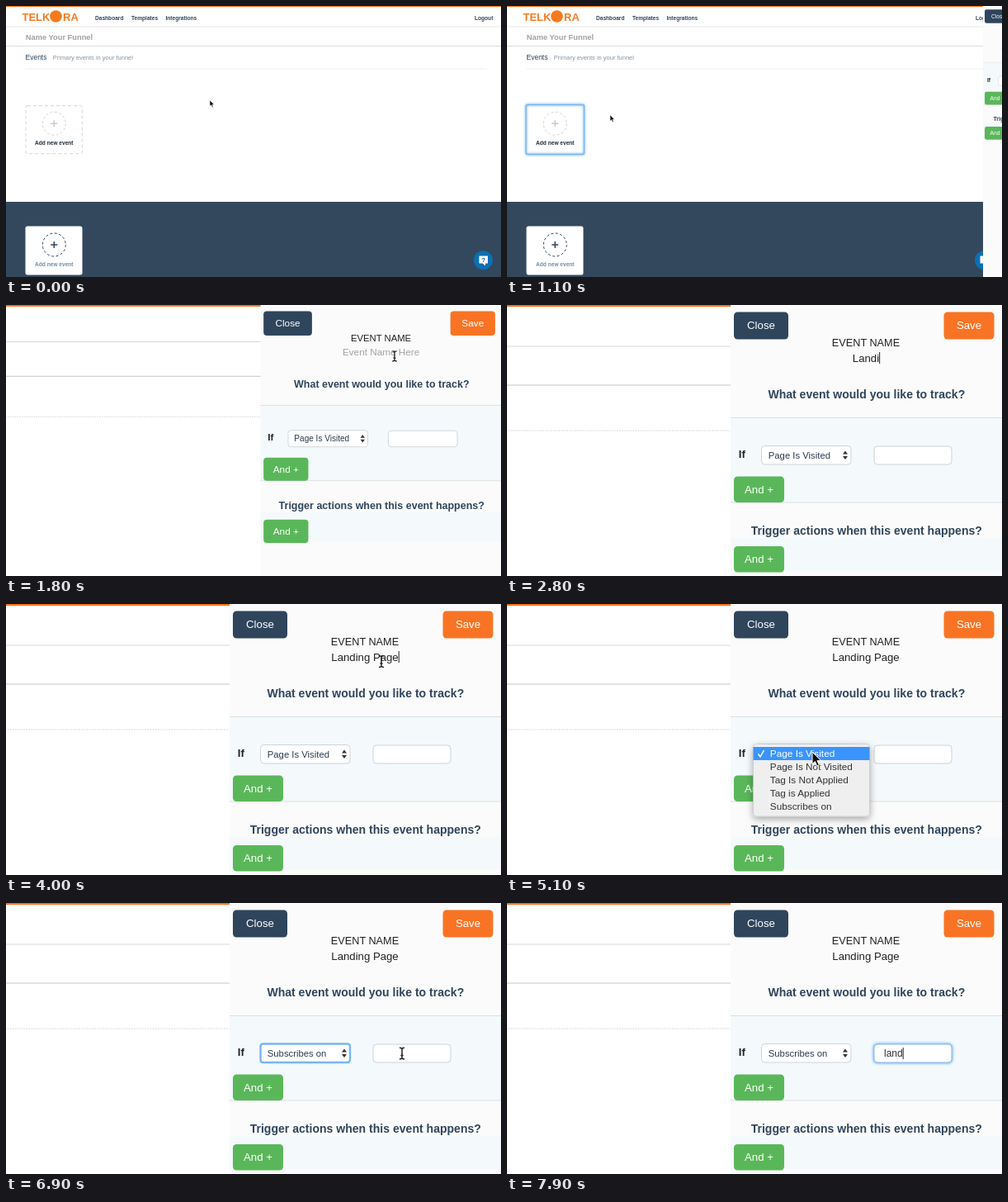
An HTML page that plays this animation: 600 px wide and 328 px high, repeating every 8 s.

```html
<!DOCTYPE html>
<html lang="en">
<head>
<meta charset="utf-8">
<title>Funnel event setup</title>
<style>
  html, body { margin: 0; width: 100%; height: 100%; overflow: hidden; background: #fff; }
  svg { display: block; width: 600px; height: 328px; font-family: "Liberation Sans", Arial, sans-serif; }
  text { white-space: pre; }
  .bold { font-weight: bold; }
  .mid { text-anchor: middle; }
  .navy { fill: #2f455c; }
  .nav { font-size: 6.6px; }
  .rule { stroke: #d9d9d9; stroke-width: .6; }
  .btn { font-size: 13.25px; fill: #fff; }
  .head { font-size: 14.05px; }
  .small { font-size: 11.3px; fill: #2b3b4d; }
  .box { fill: #fff; stroke: #ccd3da; }
  .glow { fill: none; stroke: #78b5f2; }
</style>
</head>
<body>
<svg viewBox="0 0 600 328">
  <defs>
    <filter id="shadow" x="-20%" y="-20%" width="140%" height="150%">
      <feDropShadow dx="0" dy="3" stdDeviation="4" flood-opacity=".35"/>
    </filter>
    <filter id="blur" x="-20%" y="-50%" width="140%" height="200%"><feGaussianBlur stdDeviation="1.5"/></filter>
  </defs>
  <g id="world">
    <!-- funnel page -->
    <rect width="600" height="1.1" fill="#f8701f"/>
    <g class="bold" font-size="13" fill="#f47a20">
      <text x="19.5" y="17.5">TELK</text>
      <circle cx="60.5" cy="12.5" r="7.3"/>
      <text x="69" y="17.5">RA</text>
    </g>
    <g class="nav bold navy">
      <text x="108" y="17">Dashboard</text>
      <text x="152" y="17">Templates</text>
      <text x="193.5" y="17">Integrations</text>
      <text x="568" y="17">Logout</text>
    </g>
    <path class="rule" d="M0 25H600"/>
    <text class="bold" x="23.8" y="41.3" font-size="9.3" fill="#a2a2a2">Name Your Funnel</text>
    <path class="rule" d="M0 48.5H600" style="stroke:#c6c6c6"/>
    <text class="navy" x="23.5" y="65.4" font-size="8.5">Events</text>
    <text x="56.8" y="64.5" font-size="7.5" fill="#8495a3">Primary events in your funnel</text>
    <path class="rule" d="M24 76H582" stroke-dasharray="1 .6"/>

    <rect id="card" x="24" y="120.7" width="68.3" height="58" rx="2" fill="none" stroke="#d6d6d6" stroke-dasharray="4 3"/>
    <g id="cardFocus">
      <rect class="glow" x="23" y="119.5" width="70.5" height="60" rx="2" stroke-width="2" filter="url(#blur)"/>
      <rect class="glow" x="23" y="119.5" width="70.5" height="60" rx="2" stroke-width="1.4"/>
    </g>
    <g fill="none" stroke="#c9c9c9">
      <circle cx="58.3" cy="142.3" r="14" stroke-dasharray="3 2.5" stroke-width=".8"/>
      <path d="M54.3 142.3h8m-4-4v8" stroke-width="1.5"/>
    </g>
    <text class="nav bold mid" x="58.3" y="168" fill="#1f2d3a">Add new event</text>

    <rect y="237" width="600" height="91" fill="#33485c"/>
    <rect x="23.5" y="266.5" width="69" height="59" rx="2.5" fill="#fff"/>
    <g fill="none" stroke="#2f455c">
      <circle cx="58.3" cy="289" r="14" stroke-dasharray="3 2.5"/>
      <path d="M54.3 289h8m-4-4v8" stroke-width="1.5"/>
    </g>
    <text class="nav bold mid" x="58.3" y="314.7" fill="#6f8fa9">Add new event</text>

    <circle cx="578.5" cy="307.7" r="11.5" fill="#0b6fb3"/>
    <path d="M573.5 302.5h10.5v9h-3v3l-3.2-3h-4.3z" fill="#fff"/>
    <text class="bold mid" x="578.8" y="310" font-size="8" fill="#0b6fb3">?</text>

    <!-- event panel, laid out at double size -->
    <g id="panel">
      <rect x="271" width="330" height="660" fill="#fbfbfb"/>
      <path d="M271 136.5H600V239H271zM271 282H600V322H271z" fill="#f4f9fc"/>
      <path d="M271 136.5H600M271 239H600" stroke="#d9dfe3"/>
      <rect x="275" y="8.5" width="66" height="33" rx="4.5" fill="#2f455c"/>
      <text class="btn mid" x="308" y="29.4">Close</text>
      <rect x="529.5" y="8.5" width="61" height="33" rx="4.5" fill="#f87424"/>
      <text class="btn mid" x="560" y="29.4">Save</text>
      <text class="mid" x="435" y="49.8" font-size="12.7" fill="#222">EVENT NAME</text>
      <text class="mid" id="name" x="435" y="68.7" font-size="13.2"></text>
      <path id="nameCaret" d="M0 57v14" stroke="#222"/>
      <text class="head bold navy mid" x="435.8" y="112.7">What event would you like to track?</text>
      <text class="bold" x="280.8" y="184.5" font-size="13.1" fill="#222">If</text>
      <rect class="box" x="308.5" y="170.5" width="108.5" height="22.5" rx="4"/>
      <rect class="glow" id="selectFocus" x="308.5" y="170.5" width="108.5" height="22.5" rx="3" stroke-width="2.4"/>
      <text class="small" id="choice" x="316.8" y="185.6"></text>
      <path d="M407 180.5l3-4 3 4zM407 183l3 4 3-4z" fill="#333"/>
      <rect class="glow" id="fieldGlow" x="445" y="171" width="94" height="22" rx="4" stroke-width="3" filter="url(#blur)"/>
      <rect class="box" id="field" x="445" y="171" width="94" height="22" rx="4"/>
      <text id="value" x="457" y="186" font-size="12" fill="#333"></text>
      <path id="valueCaret" d="M0 175v14" stroke="#222"/>
      <rect x="275" y="207.5" width="61" height="31.5" rx="4.5" fill="#5ab759"/>
      <text class="btn mid" x="305.5" y="227.9">And +</text>
      <text class="head bold navy mid" x="435.8" y="278">Trigger actions when this event happens?</text>
      <rect x="275" y="292" width="61" height="31.5" rx="4.5" fill="#5ab759"/>
      <text class="btn mid" x="305.5" y="312.3">And +</text>
      <g id="menu">
        <rect x="298.5" y="169.5" width="141" height="87.5" rx="4" fill="#efefef" stroke="#c4c4c4" stroke-width=".7" filter="url(#shadow)"/>
        <rect id="mark" x="298.5" width="141" height="16" fill="#3b94fb"/>
        <path id="tick" d="M304.5 181.5l2.5 3.5 4.5-8" fill="none" stroke-width="1.4"/>
      </g>
    </g>
    <path id="arrow" d="M0 0V7.3L1.7 5.8 2.9 8.6 4.2 8 3 5.3H5.3Z" fill="#111" stroke="#fff" stroke-width=".5"/>
    <path id="beam" d="M-1.5-3.4Q0-3.4 0-2.6 0-3.4 1.5-3.4M0-2.8V2.8M-1.5 3.4Q0 3.4 0 2.6 0 3.4 1.5 3.4M-.8 1.2H.8" fill="none" stroke="#222" stroke-width=".75"/>
  </g>
</svg>
<script>
const $ = id => document.getElementById(id);
const set = (id, key, value) => $(id).setAttribute(key, value);
const show = (id, on) => set(id, 'visibility', on ? 'visible' : 'hidden');
const clamp = (x, lo = 0, hi = 1) => Math.min(hi, Math.max(lo, x));
const part = (t, start, length) => clamp((t - start) / length);
const typed = (s, t, start, step) => s.slice(0, Math.max(0, Math.floor((t - start) / step) + 1));

const options = ['Page Is Visited', 'Page Is Not Visited', 'Tag Is Not Applied', 'Tag is Applied', 'Subscribes on'];
const items = options.map((label, i) => {
  const el = document.createElementNS('http://www.w3.org/2000/svg', 'text');
  el.setAttribute('x', 318.8);
  el.setAttribute('y', 185.3 + 16 * i);
  el.setAttribute('font-size', 11.8);
  el.textContent = label;
  $('menu').append(el);
  return el;
});

// pointer track: time, x, y
const track = [
  [0, 247, 114], [150, 236, 117], [400, 120, 136], [650, 64, 146], [950, 62, 146],
  [1100, 125, 132], [1400, 390, 72.5], [1600, 492, 46], [1800, 527.5, 34.8], [4000, 527.5, 34.8],
  [4250, 508, 60], [4550, 485, 90], [5100, 485, 89.5], [5450, 486, 100], [5900, 487, 122.5],
  [6350, 487, 122.5], [6600, 515, 103], [6900, 540, 91], [8000, 540, 91]
];
function pointerAt(t) {
  const i = track.findIndex(p => p[0] > t);
  const [a, b] = [track[i - 1], track[i]];
  const u = part(t, a[0], b[0] - a[0]);
  return [a[1] + (b[1] - a[1]) * u, a[2] + (b[2] - a[2]) * u];
}

function placeCaret(id, x, on) {
  set(id, 'transform', `translate(${x + .5})`);
  show(id, on);
}

function draw(t) {
  const zoom = 1 + (1 - Math.cos(Math.PI * part(t, 1175, 907))) / 2;
  set('world', 'transform', `translate(${600 * (1 - zoom)}) scale(${zoom})`);
  const slide = 168 * (1 - part(t, 1050, 900)) ** 3;
  set('panel', 'transform', `translate(${300 + slide}) scale(.5)`);
  show('panel', t > 1050);
  show('cardFocus', t >= 900 && t < 2000);
  show('card', t < 900);

  const name = typed('Landing Page', t, 2300, 120);
  $('name').textContent = name || 'Event Name Here';
  set('name', 'fill', name ? '#222' : '#a3a3a3');
  const nameEnd = 435 + (name ? 1 : -1) * $('name').getComputedTextLength() / 2;
  const blink = t < 3700 || (t - 3700) % 1000 < 500;
  placeCaret('nameCaret', nameEnd, t >= 2000 && t < 4700 && blink);

  $('choice').textContent = options[t < 6300 ? 0 : 4];
  show('selectFocus', t >= 4700 && t < 7000);

  const inField = t >= 7000;
  $('value').textContent = typed('land', t, 7350, 150);
  placeCaret('valueCaret', 457 + $('value').getComputedTextLength(), inField);
  show('fieldGlow', inField);
  set('field', 'style', inField ? 'stroke:#84b9ea' : '');

  const [x, y] = pointerAt(t);
  const current = clamp(Math.floor((2 * y - 173) / 16), 0, 4);
  set('menu', 'opacity', 1 - part(t, 6100, 200));
  show('menu', t >= 4700 && t < 6300);
  set('mark', 'y', 173 + 16 * current);
  set('tick', 'stroke', current ? '#333' : '#fff');
  items.forEach((el, i) => el.setAttribute('fill', i === current ? '#fff' : '#333'));

  const moving = t < 2250 || t >= 4000 && t < 7250;
  const overText = t >= 1700 && y < 40 || x > 522 && y > 85 && t > 6300;
  for (const id of ['arrow', 'beam']) {
    set(id, 'transform', `translate(${x} ${y})`);
    show(id, moving && overText === (id === 'beam'));
  }
}

function tick() {
  draw(Math.floor(performance.now() % 8000 / 100) * 100);
  requestAnimationFrame(tick);
}
tick();
</script>
</body>
</html>
```
